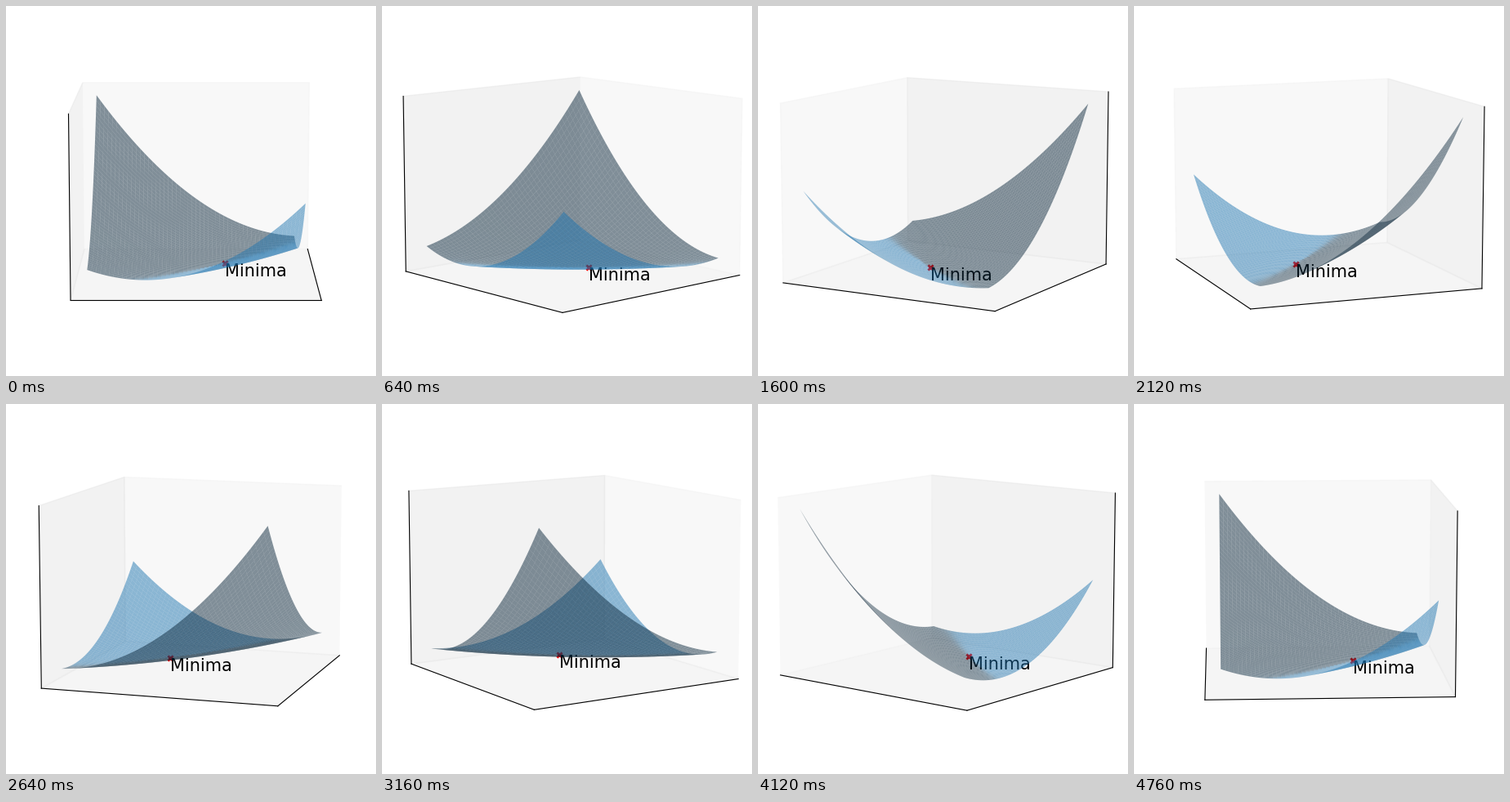
Recreate the animation shown at these times as a matplotlib script. Size 453x453 px, loop 4.8 s.

```python
import numpy as np
import matplotlib.pyplot as plt
from matplotlib.animation import FuncAnimation

SIZE, DPI = 453, 100
FRAMES, INTERVAL = 120, 40
RADIUS, HEIGHT = 10, 2500
LOW_X, LOW_Y = 0.35, 2.8
PAD = 1.1 * 25 / 24  # room between the data and the box walls


def bowl(x, y):
    """Tilted quadratic bowl, zero at (LOW_X, LOW_Y)."""
    p, q = (x - LOW_X) / RADIUS, (y - LOW_Y) / RADIUS
    return HEIGHT * (0.167 * p**2 + 0.344 * p * q + 0.223 * q**2)


fig = plt.figure(figsize=(SIZE / DPI, SIZE / DPI), dpi=DPI)
ax = fig.add_axes([0, 0, 1, 1], projection="3d")

side = np.linspace(-RADIUS, RADIUS, 51)
x, y = np.meshgrid(side, side)
ax.plot_surface(x, y, bowl(x, y), rstride=1, cstride=1, color="C0", alpha=0.5)
ax.scatter([LOW_X], [LOW_Y], [0], marker="x", color="red", linewidths=2)
ax.text(LOW_X, LOW_Y, 0, "Minima", fontsize=15, va="top", family="DejaVu Sans")

reach, mid = RADIUS * PAD, HEIGHT / 2
ax.set(xticks=[], yticks=[], zticks=[])
ax.set(xlim=(-reach, reach), ylim=(-reach, reach),
       zlim=(mid - mid * PAD, mid + mid * PAD))


def start():
    ax.view_init(elev=10, azim=0)
    return []


def turn(i):
    ax.view_init(elev=10, azim=i * 360 / FRAMES)
    return []


anim = FuncAnimation(fig, turn, frames=FRAMES, init_func=start,
                     interval=INTERVAL, repeat=True, repeat_delay=0)
plt.show()
```
